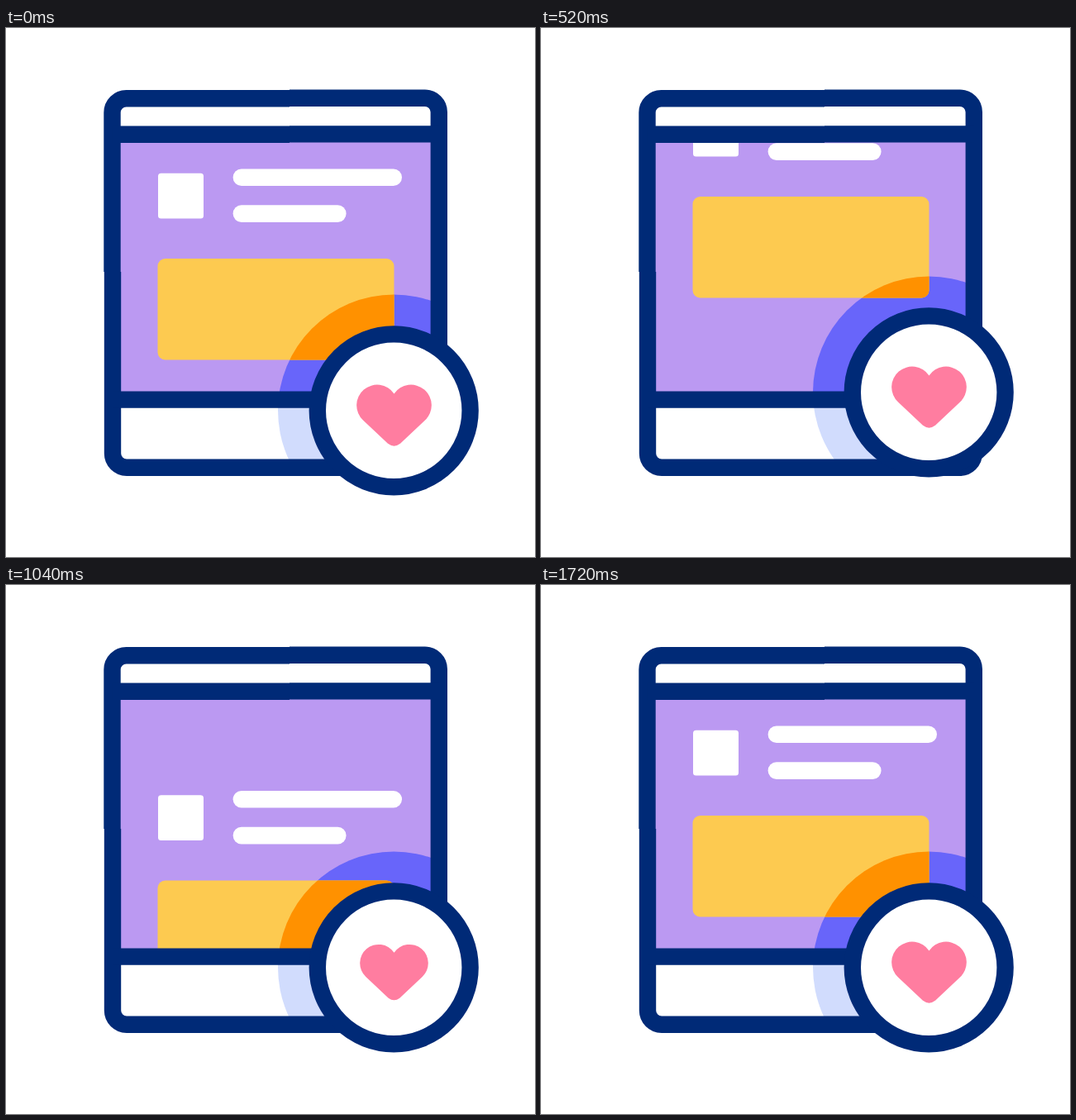
Animation of 640 by 640 pixels, one loop 2000 ms. Source, as an HTML page:

```html
<!DOCTYPE html>
<html lang="en">
<head>
<meta charset="utf-8">
<title>Scroll and like</title>
<style>
  html, body { margin: 0; width: 100%; height: 100%; overflow: hidden; background: #fff; }
  svg { display: block; width: 100%; height: 100%; }
</style>
</head>
<body>
<svg viewBox="0 0 640 640">
  <defs>
    <clipPath id="screen"><rect x="138" y="138" width="377" height="302"/></clipPath>
    <clipPath id="footer"><rect x="138" y="459" width="377" height="64"/></clipPath>
    <clipPath id="inHalo"><circle class="halo" cx="469.2" cy="462.8" r="140.2"/></clipPath>
    <clipPath id="corner"><rect width="343" height="295"/></clipPath>
    <clipPath id="rest"><path d="M343 0H640V640H0V295H343Z"/></clipPath>
    <rect id="card" x="183.5" y="279" width="286" height="122.5" rx="9"/>
    <g id="post">
      <rect x="184" y="175.7" width="55" height="54.8" rx="3.5"/>
      <rect x="274.6" y="170.5" width="204.4" height="20.6" rx="10.3"/>
      <rect x="274.6" y="214.3" width="137" height="20.6" rx="10.3"/>
    </g>
    <g id="frame" fill="none" stroke="#002a77" stroke-width="20.4">
      <rect x="129" y="84.8" width="394.8" height="447" rx="17"/>
      <path d="M129 128.4H524M129 449.6H524"/>
    </g>
  </defs>

  <g clip-path="url(#screen)">
    <path fill="#bb99f2" d="M138 138H515V440H138Z"/>
    <circle class="halo" cx="469.2" cy="462.8" r="140.2" fill="#6865fa"/>
    <g class="page" fill="#fdca50">
      <use href="#card"/><use href="#card" y="364"/>
    </g>
    <g clip-path="url(#inHalo)">
      <g class="page" fill="#ff9100">
        <use href="#card"/><use href="#card" y="364"/>
      </g>
    </g>
    <g class="page" fill="#fff">
      <use href="#post"/><use href="#post" y="364"/>
    </g>
  </g>
  <g clip-path="url(#footer)">
    <circle class="halo" cx="469.2" cy="462.8" r="140.2" fill="#d1dcfd"/>
  </g>

  <g clip-path="url(#rest)"><use href="#frame"/></g>
  <g clip-path="url(#corner)"><use href="#frame" x="-.5" y=".4"/></g>

  <g id="badge">
    <circle cx="469.2" cy="462.8" r="92.4" fill="#fff" stroke="#002a77" stroke-width="20.4"/>
    <path id="heart" fill="#ff7da0" d="M469.5 442.5A24.8 24.8 0 1 0 432 474.5L462 502.8Q469.5 508.5 477 502.8L507 474.5A24.8 24.8 0 1 0 469.5 442.5Z"/>
  </g>
</svg>
<script>
  const LOOP = 2000, STEP = 40;

  // Each key: time in ms, value, slope per ms
  const scroll = [[280, 0, .1], [520, -75, -.41], [720, -161, -.42], [1040, -285.5, -.37], [1280, -364, -.2]];
  scroll[0][2] = -.1;
  const swipe = [[80, 0], [280, 15], [520, -22], [760, 0]];
  const glow = [[80, 0], [280, 19], [520, -22], [760, 0]];
  const beat = [[720, 1], [950, .87], [1190, 1], [1460, .87], [1720, 1]];

  // Cubic Hermite interpolation, held flat outside the keys
  function valueAt(keys, t) {
    if (t <= keys[0][0]) return keys[0][1];
    const i = keys.findIndex(k => k[0] >= t);
    if (i < 0) return keys[keys.length - 1][1];
    const [t0, a, m = 0] = keys[i - 1], [t1, b, n = 0] = keys[i];
    const d = t1 - t0, u = (t - t0) / d, w = 1 - u;
    return a * w * w * (1 + 2 * u) + b * u * u * (3 - 2 * u) + d * u * w * (m * w - n * u);
  }

  const pages = document.querySelectorAll('.page');
  const halos = document.querySelectorAll('.halo');
  const badge = document.getElementById('badge');
  const heart = document.getElementById('heart');
  const shift = (el, y) => el.setAttribute('transform', `translate(0 ${y})`);

  function draw(ms) {
    const t = Math.floor(ms % LOOP / STEP) * STEP;
    const y = valueAt(scroll, t), glowY = valueAt(glow, t);
    pages.forEach(el => shift(el, y));
    halos.forEach(el => shift(el, glowY));
    shift(badge, valueAt(swipe, t));
    heart.setAttribute('transform',
      `translate(469.5 468.5) scale(${valueAt(beat, t)}) translate(-469.5 -468.5)`);
  }

  const start = performance.now();
  function tick() {
    draw(performance.now() - start);
    requestAnimationFrame(tick);
  }
  tick();
</script>
</body>
</html>
```
